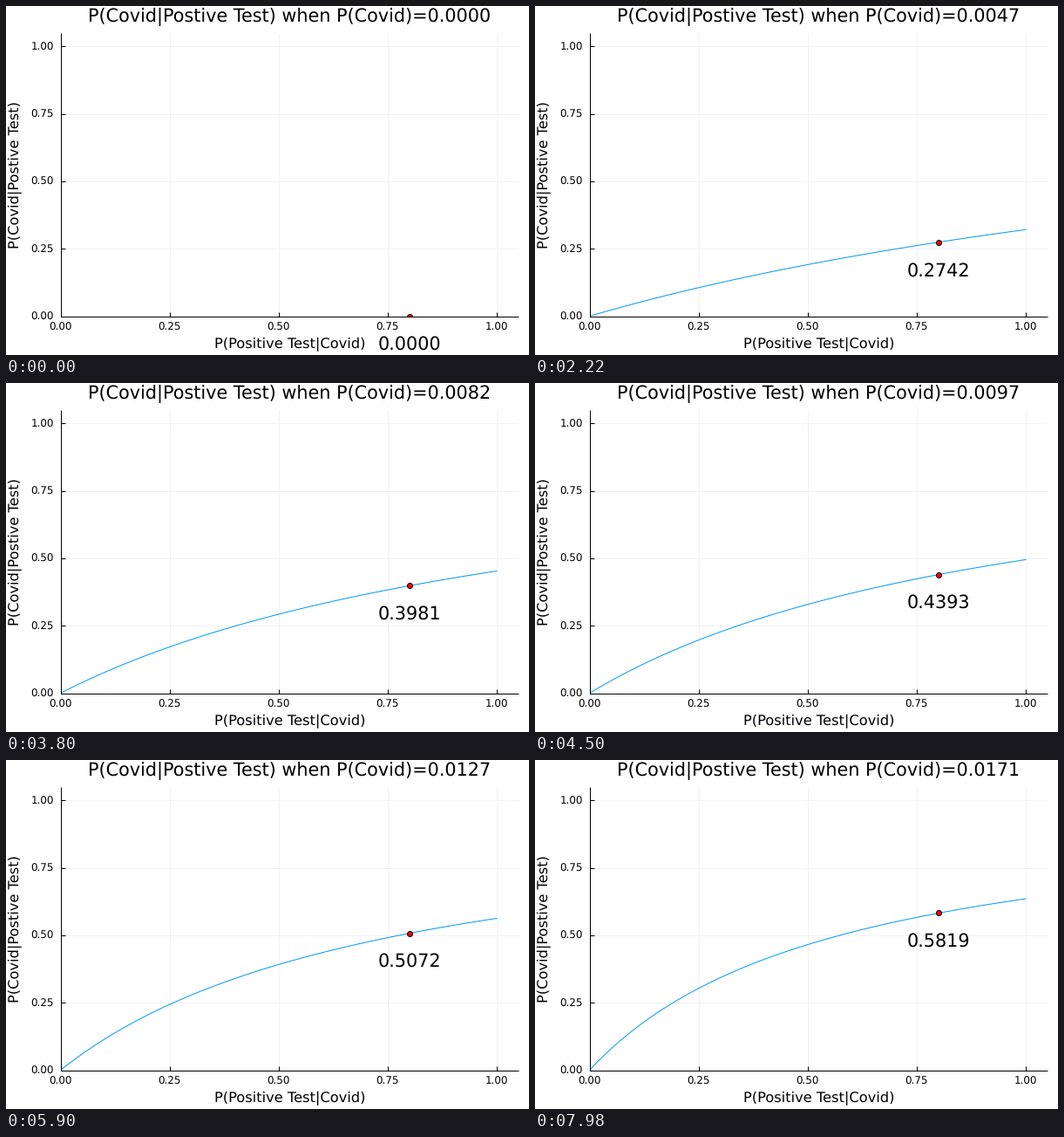
A matplotlib script that plays this animation: 600x400 px, repeating every 8000 ms.

```python
import numpy as np
import matplotlib.pyplot as plt
from matplotlib.animation import FuncAnimation
from matplotlib.patches import Rectangle

W, H = 600, 400
STEP_MS, LOOP_MS = 20, 8000
LEFT, RIGHT, TOP, BOTTOM = 62.5, 588.0, 30.7, 355.5
UNIT_X, UNIT_Y = (RIGHT - LEFT) / 1.05, (BOTTOM - TOP) / 1.05
TITLE_SIZE, LABEL_SIZE, TICK_SIZE = 20.7, 16.3, 11.85
FALSE_POSITIVE = 0.01
SENSITIVITY = 0.8

plt.rcParams.update({"font.family": "DejaVu Sans", "text.hinting": "none"})
fig = plt.figure(figsize=(W / 72, H / 72), dpi=72, facecolor="white")
ax = fig.add_axes([0, 0, 1, 1])
ax.set_xlim(0, W)
ax.set_ylim(H, 0)
ax.axis("off")


def px(x):
    return LEFT + UNIT_X * x


def py(y):
    return BOTTOM - UNIT_Y * y


def segment(x0, y0, x1, y1, color, z):
    ax.plot([x0, x1], [y0, y1], color=color, lw=1, zorder=z,
            solid_capstyle="butt")


def label(x, y, text, size, ha="center", **kw):
    kw.setdefault("va", "baseline")
    return ax.text(x, y, text, fontsize=size, ha=ha, color="black", **kw)


def posterior(sens, prior):
    hit = sens * prior
    return hit / (hit + FALSE_POSITIVE * (1 - prior))


# grid, ticks and axes
for v in np.linspace(0, 1, 5):
    x, y = px(v), py(v)
    if v > 0:
        segment(x, TOP, x, BOTTOM, "#f1f1f1", 1)
        segment(LEFT, y, RIGHT, y, "#f1f1f1", 1)
    segment(x, BOTTOM, x, BOTTOM - 5, "black", 4)
    segment(LEFT, y, LEFT + 5, y, "black", 4)
    label(x, 371.8, f"{v:.2f}", TICK_SIZE)
    label(54.7, y + 4.4, f"{v:.2f}", TICK_SIZE, ha="right")
segment(LEFT, BOTTOM, RIGHT, BOTTOM, "black", 4)
segment(LEFT, TOP, LEFT, BOTTOM, "black", 4)

mid_x, mid_y = (LEFT + RIGHT) / 2, (TOP + BOTTOM) / 2
label(mid_x, 392.3, "P(Positive Test|Covid)", LABEL_SIZE)
label(16.7, mid_y, "P(Covid|Postive Test)", LABEL_SIZE, ha="right",
      va="center", rotation=90, rotation_mode="default").set(
          ha="center", x=10.6)

# moving parts
title = label(mid_x, 18.3, "", TITLE_SIZE)
value = label(px(SENSITIVITY), 0, "", TITLE_SIZE, zorder=6)
sens = np.linspace(0, 1, 101)
curve, = ax.plot(px(sens), py(0 * sens), color="#009af9", lw=1, zorder=2)
dot, = ax.plot([px(SENSITIVITY)], [BOTTOM], "o", ms=6, mfc="red",
               mec="black", mew=1, zorder=3)
frame_box = Rectangle((LEFT, TOP), RIGHT - LEFT, BOTTOM + 0.5 - TOP,
                      transform=ax.transData)
curve.set_clip_path(frame_box)
dot.set_clip_path(frame_box)


def count_at(ms):
    """Three counts every 140 ms, held for 20, 100 and 20 ms."""
    cycle, rest = divmod(ms, 140)
    return 3 * cycle + (rest >= 20) + (rest >= 120)


def update(i):
    prior = count_at(i * STEP_MS) / 10000
    p = posterior(SENSITIVITY, prior)
    title.set_text(f"P(Covid|Postive Test) when P(Covid)={prior:.4f}")
    value.set_text(f"{p:.4f}")
    value.set_y(py(p - 0.1) + 7.6)
    curve.set_ydata(py(posterior(sens, prior)))
    dot.set_ydata([py(p)])
    return title, value, curve, dot


anim = FuncAnimation(fig, update, frames=LOOP_MS // STEP_MS,
                     init_func=lambda: update(0), interval=STEP_MS,
                     repeat=True, repeat_delay=0, blit=False)
plt.show()
```
